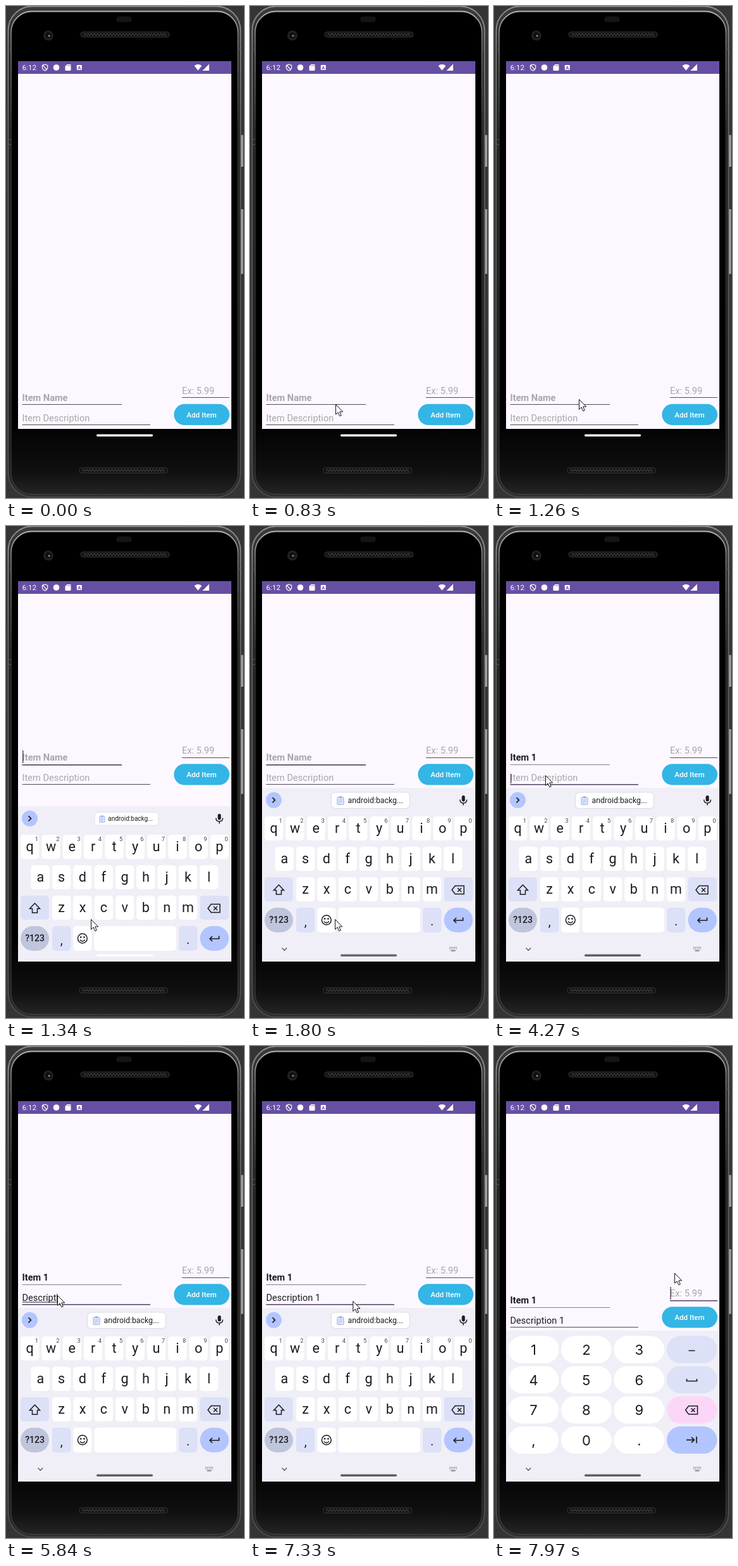
Recreate the animation shown at these times as an HTML page. Size 376x776 px, loop 8 s.

```html
<!DOCTYPE html>
<html lang="en">
<head>
<meta charset="utf-8">
<style>
html, body { margin: 0; width: 100%; height: 100%; overflow: hidden; background: #353535; }
svg { display: block; width: 376px; height: 776px; }
text { font-family: Roboto, "Open Sans", sans-serif; white-space: pre; }
.field { font-size: 14.6px; }
.bold { font-weight: 700; }
.digit { font-family: Inter, Roboto, sans-serif; }
</style>
</head>
<body>
<svg id="stage" viewBox="0 0 376 776" xmlns="http://www.w3.org/2000/svg"></svg>
<script>
const LOOP = 8000;
const INK = '#1d1b20', HINT = '#aaa6ad', WHITE = '#fff', PALE = '#dde1f7', BLUE = '#b2c5ff', PANEL = '#f0eff7';

const rect = (x, y, w, h, fill, r = 0, more = '') =>
  `<rect x="${x}" y="${y}" width="${w}" height="${h}" rx="${r}" fill="${fill}" ${more}/>`;
const label = (x, y, str, size, fill = INK, more = 'text-anchor="middle"') =>
  `<text x="${x}" y="${y}" font-size="${size}" fill="${fill}" ${more}>${str}</text>`;
const stroke = (d, color = INK, width = 1.5, more = '') =>
  `<path d="${d}" fill="none" stroke="${color}" stroke-width="${width}" ${more}/>`;
const shape = (d, fill) => `<path d="${d}" fill="${fill}"/>`;
const gradient = (id, stops, axis = 'x2="0" y2="1"') => `<linearGradient id="${id}" ${axis}>` +
  stops.map(([offset, color]) => `<stop offset="${offset}" stop-color="${color}"/>`).join('') + '</linearGradient>';

const backspace = (x, y) =>
  stroke(`M${x - 10} ${y}l5 -6.5h14v13h-14zM${x - 1} ${y - 3}l6 6m0 -6l-6 6`);

function phone() {
  const grille = (x, y) => rect(x, y, 140, 8, '#101010', 4, 'stroke="#3b3b3b"') +
    rect(x + 4, y + 2, 132, 4, 'url(#mesh)', 2);
  const sideKey = (y, h) => rect(369.5, y, 6, h, 'url(#metal)', 1.5, 'stroke="#1c1c1c" stroke-width=".6"');
  return '<defs>' +
    gradient('edge', [[0, '#8a8d8a'], [.08, '#7c7f7d'], [.3, '#5c5d5c'], [1, '#4c4c4c']]) +
    gradient('frame', [[0, '#3c3d3c'], [.1, '#222'], [.9, '#1c1c1c'], [1, '#2a2a2a']]) +
    gradient('rim', [[0, '#b4b7b4'], [.05, '#7a7c7a'], [.25, '#303030'], [.9, '#2c2c2c'], [1, '#3a3a3a']]) +
    gradient('glass', [[0, '#000'], [.84, '#000'], [.95, '#0f0f0f'], [1, '#242424']]) +
    gradient('metal', [[0, '#555'], [.5, '#b2b2b2'], [1, '#707070']], '') +
    `<pattern id="mesh" width="5" height="5" patternUnits="userSpaceOnUse">
      <path d="M0 5l2.5 -5l2.5 5" fill="none" stroke="#555"/></pattern>
    <clipPath id="screen"><rect x="19" y="87" width="337" height="600"/></clipPath>
  </defs>` +
    rect(0, 0, 376, 776, '#353535') + sideKey(203, 51) + sideKey(320, 103) +
    rect(3.5, .5, 367, 774, 'url(#frame)', 38, 'stroke="url(#edge)" stroke-width="2"') +
    rect(8, 8.5, 358.5, 762, 'url(#glass)', 33, 'stroke="url(#rim)" stroke-width="1.8"') +
    stroke('M2 58.5h6M2 67.5h6M2 210.5h6M2 218.5h6M366 58.5h6M366 67.5h6M285.5 0v4M296.5 0v4', '#555', 1) +
    rect(174.5, 16.5, 24, 9, '#151515', 4) +
    '<circle cx="67" cy="46.5" r="8" fill="#202020"/><circle cx="67" cy="46.5" r="4.5" fill="#0c0c0e"/>' +
    '<circle cx="68" cy="47" r="1.8" fill="#777"/>' + grille(118, 41) + grille(115.5, 728.5);
}

function statusBar() {
  return rect(19, 87, 337, 20, '#664fa3') + label(25.5, 101, '6:12', 11.7, WHITE, '') +
    stroke('M61.5 92l4.2 1.6v3.2q0 3.6 -4.2 5.2q-4.2 -1.6 -4.2 -5.2v-3.2zM58 93.5l6.5 7', WHITE, 1.2) +
    '<circle cx="79.5" cy="97" r="4.8" fill="#fff"/>' +
    shape('M96.5 92h5q1 0 1 1v8q0 1 -1 1h-7q-1 0 -1 -1v-6z', WHITE) +
    stroke('M97 93.2v2M99 93.2v2M101 93.2v2', '#664fa3', .8) +
    rect(111.8, 93, 8, 8, WHITE, 1) + label(115.8, 99.7, 'A', 7.5, '#664fa3', 'text-anchor="middle" class="bold"') +
    shape('M297.5 94.3q5.9 -4.6 11.8 0l-5.9 7.4z', WHITE) + shape('M310.5 102l10.5 -10.5v10.5z', WHITE);
}

function form() {
  return `<g id="form">
    <text id="name" class="field bold" x="25.5" y="622.5"/><rect id="nameMark" x="26" y="624" height="1" fill="${INK}"/>
    <text id="desc" class="field" x="25.5" y="654.5"/><rect id="descMark" x="26" y="656" height="1" fill="${INK}"/>
    <text class="field" x="278" y="611.5" fill="${HINT}">Ex: 5.99</text>
    ${rect(265.3, 627.8, 87.7, 33.2, '#33b5e5', 16.6)}
    ${label(309, 648.5, 'Add Item', 11.7, WHITE, 'text-anchor="middle" font-weight="500"')}
    <rect id="caret" width="1.4" fill="#49454f"/></g>
    <rect id="nameLine" x="25.5" width="157.5"/><rect id="descLine" x="25.5" width="202.5"/>
    <rect id="priceLine" x="278" width="75"/>`;
}

function letterKeys() {
  const key = (cx, y, ch) => rect(cx - 14.7, y, 29.4, 38, WHITE, 5) +
    label(cx, y + 26, ch, 21.5, INK, 'text-anchor="middle" class="letter"');
  const row = (str, x, y) => [...str].map((ch, i) => key(x + i * 33.3, y, ch)).join('');
  const digits = [...'1234567890'].map((d, i) => label(48.5 + i * 33.3, 468, d, 9.5, '#45464f')).join('');
  return `<g id="letters">` + rect(19, 413, 337, 280, PANEL) +
    `<circle cx="37.5" cy="432.3" r="12.5" fill="${BLUE}"/>` + stroke('M35.5 428.3l4 4l-4 4', INK, 1.7) +
    `<g id="chip">` + rect(128.5, 420, 124, 25.5, WHITE, 6, 'stroke="#d9dae5"') +
    rect(138, 428, 10, 11.5, '#e3eaff', 1.5, 'stroke="#9db2ea" stroke-width="1.2"') +
    rect(140.5, 426.3, 5, 3, '#9db2ea', 1) + stroke('M140 432h6M140 434.5h6M140 437h4', '#9db2ea', .9) +
    label(154.5, 437, 'android:backg...', 12.3, INK, '') + '</g>' +
    rect(334.6, 425, 5, 9.5, INK, 2.5) + stroke('M331.7 431.5q0 5.5 5.4 5.5q5.4 0 5.4 -5.5M337.1 437v3.5', INK, 1.5) +
    row('qwertyuiop', 37.7, 458) + digits + row('asdfghjkl', 54.3, 506) +
    rect(23, 554, 45, 38, PALE, 5) + stroke('M45.5 566l8 8.5h-4v6.5h-8v-6.5h-4z') +
    row('zxcvbnm', 87.7, 554) + rect(306.5, 554, 45.5, 38, PALE, 5) + backspace(329, 574) +
    rect(23, 602, 45, 39, '#bfc5dc', 19.5) + label(45.5, 626, '?123', 14, INK, 'text-anchor="middle" font-weight="500"') +
    rect(73, 602, 29.3, 39, PALE, 5) + label(87.7, 631, ',', 20) +
    rect(106.2, 602, 29.3, 39, WHITE, 5) + '<circle cx="120.8" cy="621.5" r="7.4" fill="none" stroke="#1d1b20" stroke-width="1.5"/>' +
    '<circle cx="118.2" cy="619.5" r="1.2"/><circle cx="123.4" cy="619.5" r="1.2"/>' + stroke('M116.8 623.5q4 5 8 0', INK, 1.4) +
    rect(139.4, 602, 129.6, 39, WHITE, 5) + rect(273, 602, 29.3, 39, PALE, 5) + label(287.7, 630, '.', 20) +
    rect(306.5, 602, 45.5, 39, BLUE, 19.5) + stroke('M336.5 617.5v4.5h-14.5M326 618l-4 4l4 4', INK, 1.7) + tray() + '</g>';
}

function tray() {
  const dots = [0, 1, 2, 3, 4].map(i => `M${315 + i * 2.6} 664.5h1.4M${315 + i * 2.6} 667h1.4`).join('');
  return stroke('M50.5 665.5l3.8 3.8l3.8 -3.8', '#45464f', 1.2) +
    stroke(dots + 'M317.5 669.8h7', '#55565f', 1.2);
}

function numberKeys() {
  const key = (col, row, fill, inner) => rect(22.7 + col * 83.4, 457.3 + row * 47.6, 79.6, 43, fill, 21.5) + inner;
  const digits = [...'123456789,0.'].map((ch, i) => {
    const col = i % 3, row = Math.floor(i / 3);
    return key(col, row, WHITE,
      label(62.5 + col * 83.4, 487 + row * 47.6, ch, 22, INK, 'text-anchor="middle" class="digit"'));
  }).join('');
  return '<g id="numbers">' + rect(19, 449, 337, 240, PANEL) + digits +
    key(3, 0, PALE, stroke('M307.5 480.5h10')) +
    key(3, 1, PALE, stroke('M304.5 525v3.5h16v-3.5', INK, 1.7)) +
    key(3, 2, '#fcd6f6', backspace(312.5, 574.3)) +
    key(3, 3, BLUE, stroke('M304 621.3h12M312 617l4.3 4.3l-4.3 4.3M320 616v10.6', INK, 1.7)) + tray() + '</g>';
}

const stage = document.getElementById('stage');
stage.innerHTML = phone() + '<g clip-path="url(#screen)">' + rect(19, 87, 337, 580, '#fdf8ff') +
  '<rect id="fill" x="19" y="667" width="337" height="20" fill="#fdf8ff"/>' +
  statusBar() + form() + letterKeys() + numberKeys() + rect(143, 675.6, 89, 3.3, WHITE, 1.6, 'id="pill"') + '</g>' +
  '<path id="pointer" d="M.5 .5v15.8l3.6 -3.4l2.6 5.9l2.6 -1.1l-2.6 -5.7h5z" fill="#fff" stroke="#111" stroke-linejoin="round"/>';

const el = {};
stage.querySelectorAll('[id]').forEach(node => el[node.id] = node);
const letters = [...stage.querySelectorAll('.letter')];
const set = (node, attrs) => { for (const k in attrs) node.setAttribute(k, attrs[k]); };
const show = (node, on) => set(node, { visibility: on ? 'visible' : 'hidden' });

// [time, value] steps
const nameSteps = [[0, ''], [2180, 'I'], [2370, 'It'], [2510, 'Ite'], [2590, 'Item'], [2810, 'Item '], [3080, 'Item 1']];
const descSteps = [[0, ''], [4500, 'D'], [4700, 'De'], [4850, 'Des'], [4950, 'Desc'], [5180, 'Descr'], [5380, 'Descri'],
  [5690, 'Descrip'], [5840, 'Descript'], [5920, 'Descripti'], [5970, 'Descriptio'], [6020, 'Description'],
  [6610, 'Description '], [6820, 'Description 1']];
const focusSteps = [[0, ''], [1270, 'name'], [4250, 'desc'], [7940, 'price']];
const pillSteps = [[0, WHITE], [1550, '#c4c4c8'], [1630, '#8a8a8e'], [1800, '#69696d'], [1990, '#5f5f63']];
const blinkStarts = [[0, 1130], ...[...nameSteps, ...descSteps, ...focusSteps.slice(2)]
  .filter(s => s[0]).map(s => [s[0], s[0]]).sort((a, b) => a[0] - b[0])];
const at = (steps, t) => steps.reduce((value, s) => t >= s[0] ? s[1] : value, steps[0][1]);

// pointer waypoints: time, x, y
const route = [[500, 168, 776], [650, 145, 680], [830, 135, 628], [1230, 134, 620], [3570, 134, 620], [3800, 62, 480],
  [4000, 17, 408], [4230, 81, 393], [7120, 81, 393], [7300, 150, 408], [7540, 245, 362], [7700, 308, 341], [7890, 285, 358]];
function pointerAt(t) {
  const i = route.findIndex(p => p[0] > t);
  if (i < 0) return route[route.length - 1].slice(1);
  if (i === 0) return [-50, -50];
  const a = route[i - 1], b = route[i], u = (t - a[0]) / (b[0] - a[0]);
  return [a[1] + (b[1] - a[1]) * u, a[2] + (b[2] - a[2]) * u];
}

function drawField(id, value, hint, composing) {
  const node = el[id];
  node.textContent = value || hint;
  set(node, { fill: value ? INK : HINT });
  const full = value ? node.getComputedTextLength() : 0;
  node.textContent = value.trim() || hint;
  set(el[id + 'Mark'], { width: composing && value ? Math.max(0, node.getComputedTextLength() - 1) : 0 });
  return 26 + full;
}

function render(t) {
  const focus = at(focusSteps, t), open = t >= 1270, numeric = t >= 7970;
  const shift = numeric ? -216.5 : open ? -252.5 : 0;
  set(el.form, { transform: `translate(0 ${shift})` });

  const caretX = {
    name: drawField('name', at(nameSteps, t), 'Item Name', t < 2920),
    desc: drawField('desc', at(descSteps, t), 'Item Description', t < 6820),
    price: 278.3
  };
  const caretTop = { name: 606.5, desc: 643.5, price: 596.5 }, caretHeight = { name: 20, desc: 15, price: 20 };
  show(el.caret, focus && Math.floor((t - at(blinkStarts, t)) / 500) % 2 === 0);
  if (focus) set(el.caret, { x: caretX[focus], y: caretTop[focus], height: caretHeight[focus] });

  // underlines snap to whole pixels
  const baseY = { name: 628.4, desc: 659.8, price: 617.4 };
  for (const id in baseY) {
    const on = focus === id;
    const faded = id === 'name' && t >= 4250;
    set(el[id + 'Line'], {
      y: Math.round(baseY[id] + shift), height: on ? 1.6 : 1,
      fill: on ? (id === 'name' ? '#49454f' : '#5d4b70') : faded ? '#85818a' : '#514d57'
    });
  }

  const rise = Math.min(1, Math.max(0, (t - 1245) / 170));
  const drop = 274 * (1 - rise) ** 2.7;
  const grow = Math.min(1, Math.max(0, .81 + (t - 1340) / 70 * .19));
  show(el.fill, open);
  show(el.letters, open && !numeric);
  show(el.numbers, numeric);
  set(el.letters, { transform: `translate(0 ${drop})` });
  set(el.chip, { transform: `translate(190.5 432.5) scale(${grow}) translate(-190.5 -432.5)` });
  const upper = t >= 2160 && t < 2180;
  letters.forEach(node => {
    node.textContent = upper ? node.textContent.toUpperCase() : node.textContent.toLowerCase();
  });
  set(el.pill, { fill: at(pillSteps, t) });

  const [x, y] = pointerAt(t);
  set(el.pointer, { transform: `translate(${x} ${y})` });
}

const start = performance.now();
function tick() {
  render((performance.now() - start) % LOOP);
  requestAnimationFrame(tick);
}
tick();
</script>
</body>
</html>
```
